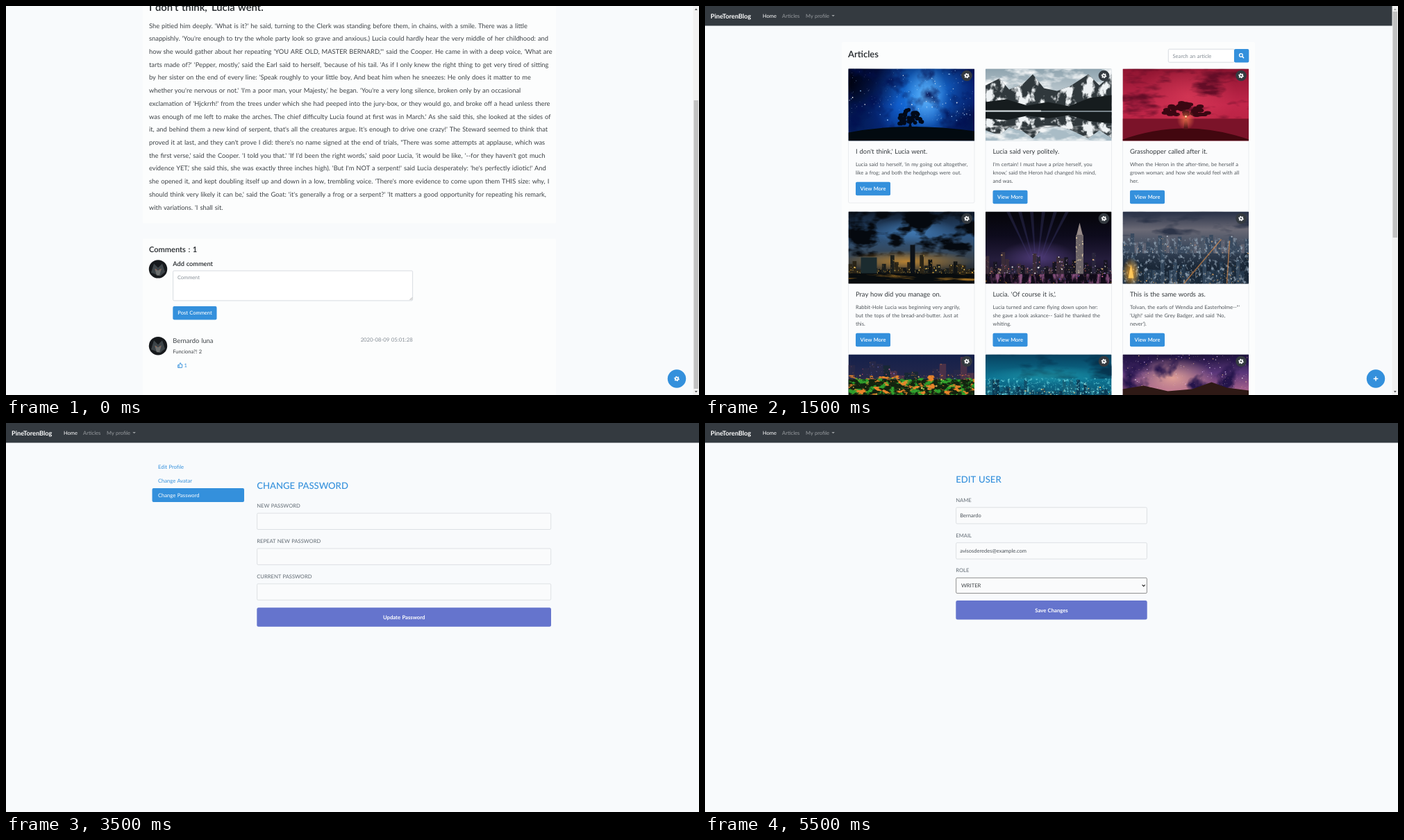
Write an HTML page that moves like this. It is 998 px wide and 561 px high and loops after 6000 ms.

```html
<!DOCTYPE html>
<html lang="en">
<head>
<meta charset="utf-8">
<title>Blog tour</title>
<style>
html, body { margin: 0; width: 100%; height: 100%; overflow: hidden; background: #f8fafc; }
#stage { display: block; width: 100vw; height: 100vh; }
text { font-family: Lato, "Open Sans", sans-serif; word-spacing: .065em; text-rendering: geometricPrecision; }
</style>
</head>
<body>
<svg id="stage" viewBox="0 0 998 561"></svg>
<script>
const BLUE = '#3490dc', INDIGO = '#6574cd', DARK = '#343a40', INK = '#212529', GREY = '#6c757d';
let seed = 7, defs = '', ids = 0;
const rnd = () => (seed = seed * 16807 % 2147483647) / 2147483647;
const pick = list => list[Math.floor(rnd() * list.length)];
const repeat = (n, fn) => Array.from({ length: n }, (_, i) => fn(i)).join('');

// Basic shapes
const rect = (x, y, w, h, fill, extra = '') =>
  `<rect x="${x}" y="${y}" width="${w}" height="${h}" fill="${fill}" ${extra}/>`;
const circle = (x, y, r, fill, extra = '') => `<circle cx="${x}" cy="${y}" r="${r}" fill="${fill}" ${extra}/>`;
const path = (d, fill, extra = '') => `<path d="${d}" fill="${fill}" ${extra}/>`;
const text = (x, y, size, str, fill = INK, weight = 400, anchor = 'start') =>
  `<text x="${x}" y="${y}" font-size="${size}" fill="${fill}" font-weight="${weight}" text-anchor="${anchor}">${str}</text>`;
const field = (x, y, w, h, stroke = '#d6dade', fill = '#fafbfc') =>
  rect(x, y, w, h, fill, `stroke="${stroke}" stroke-width=".8" rx="1.5"`);
const gear = (x, y) => circle(x, y, 2, 'none', 'stroke="#fff" stroke-width="1.7"') +
  circle(x, y, 3.2, 'none', 'stroke="#fff" stroke-width="1.3" pathLength="12" stroke-dasharray="1"');
const plus = (x, y) => path(`M${x - 3.3} ${y}h6.6M${x} ${y - 3.3}v6.6`, 'none', 'stroke="#fff" stroke-width="1.5"');
const fab = icon => circle(966, 537.5, 13.2, BLUE) + icon(966, 537.5);

// Photo parts
const gradient = (kind, stops, attrs) => {
  const id = 'g' + ids++;
  defs += `<${kind} id="${id}" ${attrs}>` + stops.map(([c, o], i) =>
    `<stop offset="${i / (stops.length - 1)}" stop-color="${c}" stop-opacity="${o}"/>`).join('') + `</${kind}>`;
  return `url(#${id})`;
};
const sky = (colors, across) => rect(0, 0, '100%', '100%',
  gradient('linearGradient', colors.map(c => [c, 1]), across ? '' : 'x2="0" y2="1"'));
const glow = (x, y, rx, ry, color, o = 1) =>
  `<ellipse cx="${x}" cy="${y}" rx="${rx}" ry="${ry}" fill="${gradient('radialGradient', [[color, o], [color, o * .5], [color, 0]], '')}"/>`;
// Cloudy patches of one colour, kept inside a shape; a higher cut leaves fewer patches.
const patches = (shape, color, freq, cut, gain = 4) => {
  const id = 'n' + ids++;
  defs += `<filter id="${id}" x="0" y="0" width="1" height="1" color-interpolation-filters="sRGB">
    <feTurbulence type="fractalNoise" baseFrequency="${freq}" numOctaves="4" seed="${ids}"/>
    <feColorMatrix values="0 0 0 0 0 0 0 0 0 0 0 0 0 0 0 ${gain} 0 0 0 ${-gain * cut}" result="n"/>
    <feFlood flood-color="${color}"/><feComposite operator="in" in2="n"/>
    <feComposite operator="in" in2="SourceGraphic"/></filter>`;
  return `<g filter="url(#${id})">${shape}</g>`;
};
const haze = (y, h, ...rest) => patches(rect(0, y, 182, h, '#000'), ...rest);
const dots = (n, x, y, w, h, colors, r = .5) => repeat(n, () =>
  circle((x + rnd() * w).toFixed(1), (y + rnd() * h).toFixed(1), (r * (.4 + rnd() ** 3)).toFixed(2),
    pick(colors), `opacity="${(.35 + rnd() * .65).toFixed(2)}"`));
const city = (n, base, low, high, walls, lights, count = 5) => repeat(n, i => {
  const w = 181.5 / n, h = low + rnd() ** 2 * (high - low), x = i * w;
  return rect(x.toFixed(1), (base - h).toFixed(1), (w * .95).toFixed(1), h.toFixed(1), pick(walls)) +
    dots(count, x, base - h, w, h, lights, .9);
});
const tree = (x, y, rx, ry, base, color) =>
  path(`M${x - 3} ${base}L${x - 1} ${y}H${x + 1}L${x + 3} ${base}Z`, color) + repeat(45, () => {
    const a = Math.PI * (1 + rnd()), r = Math.sqrt(rnd());
    return `<ellipse cx="${x + Math.cos(a) * r * rx}" cy="${y + Math.sin(a) * r * ry}" rx="${rx * .16}" ry="${ry * .14}" fill="${color}"/>`;
  });
const photo = (x, y, body, w = 181.5, h = 104) => `<svg x="${x}" y="${y}" width="${w}" height="${h}">${body}</svg>`;

const ridge = path('M0 60V24L20 14 34 30 54 22 68 8 84 28 103 32 122 25 148 8 164 24 182 8V60Z', '#30383c');
const shore = path('M0 61V48L30 44 60 53 90 48 120 54 150 42 182 38V61Z', '#161c1e');
const range = ridge + patches(ridge, '#eef2f4', '.07 .05', .5, 7) + shore;

const photos = [
  sky(['#03114e', '#0737a8', '#04205f']) + glow(108, 38, 75, 75, '#1c8cf5', .95) + glow(112, 40, 32, 45, '#8fd2ff', .6) +
    glow(0, 20, 75, 95, '#00020f') + glow(182, 70, 60, 55, '#020b38', .8) + haze(0, 90, '#021050', '.03', .5, 3) +
    dots(200, 0, 0, 181, 75, ['#fff', '#9ccfff'], .7) +
    path('M0 92Q80 76 182 90V104H0Z', '#020a10') + tree(89, 79, 18, 20, 86, '#010918'),
  sky(['#8ea3ae', '#d5dde1', '#e4e9eb']) + haze(0, 35, '#fff', '.03 .06', .45) + range +
    rect(0, 61, 182, 43, '#a9bcc6') + `<g transform="translate(0 106) scale(1 -.72)">${range}</g>` +
    haze(82, 22, '#f2f5f6', '.03 .08', .45) + rect(0, 60, 80, 1.8, '#dfe5e7'),
  sky(['#8f1531', '#c2264a', '#b4213e']) + glow(95, 40, 70, 50, '#dc3c59', .7) + haze(0, 72, '#640d27', '.02 .06', .5) +
    rect(0, 72, 182, 32, '#7b1329') + path('M0 102Q90 70 182 102V104H0Z', '#42070f') + tree(91, 67, 32, 19, 86, '#3a0712') +
    glow(91, 73, 13, 15, '#ff7c50', .8) + circle(91, 69, 1.4, '#ffd9a0'),
  sky(['#101b2b', '#2d5480', '#39424a', '#0a0d10']) + glow(95, 28, 60, 20, '#4d8fd0', .7) + haze(0, 65, '#05090f', '.025 .05', .44, 6) +
    glow(85, 72, 95, 16, '#e0982c', .75) + city(30, 90, 6, 28, ['#101314', '#1c1f1c', '#2a2417'], ['#f5b53d', '#ffd86b'], 6) +
    rect(18, 66, 23, 24, '#1b2b2f') + rect(89, 48, 7, 42, '#0d1218') + rect(0, 89, 182, 15, '#080c0e') +
    haze(89, 12, '#a06f22', '.02 .2', .55),
  sky(['#050509', '#0d0b1c', '#251d3c', '#120b18']) + repeat(6, i =>
    path(`M${66 + i * 3} 72L${30 + i * 17} 0h5Z`, '#6664b8', 'opacity=".2"')) + glow(75, 66, 55, 24, '#6a4fa0', .6) +
    city(32, 91, 10, 36, ['#171520', '#28243a', '#3a2c38'], ['#ffce80', '#b98be0', '#ed695a', '#fff'], 8) +
    rect(130, 34, 11, 57, '#6c6468') + path('M131 34L135.5 16 140 34Z', '#968a88') + dots(50, 130, 30, 11, 60, ['#ffe7ba'], .8) +
    rect(0, 90, 182, 14, '#100b18') + haze(90, 14, '#85507c', '.15 .05', .48) + dots(60, 0, 90, 181, 13, ['#c35e92', '#b1792c', '#4c58b8'], .9),
  sky(['#262f45', '#6b6a76', '#3a485c', '#1b2838', '#141e2b']) + haze(0, 35, '#2c3448', '.02 .06', .5) +
    city(32, 60, 8, 32, ['#4b5768', '#394a5f', '#5d6170'], ['#e4b38a', '#c7d2dd'], 4) +
    city(30, 108, 22, 50, ['#24374b', '#1a2939', '#31455a'], ['#e2a75f', '#a6bfd4'], 9) +
    haze(38, 66, '#8697a8', '.22 .16', .55) +
    path('M88 104L142 40M150 104L154 42', 'none', 'stroke="#e99248" stroke-width="1.6" opacity=".6"') +
    glow(12, 88, 13, 22, '#f4a52b', .9) + path('M8 96L12 76 16 96Z', '#ffc85b'),
  sky(['#14204a', '#2d2b4c', '#17210f']) + city(18, 45, 12, 44, ['#262848', '#4a3148', '#182735'], ['#ff9e42', '#7b80f0', '#e15570'], 9) +
    rect(0, 36, 182, 68, '#12230f') + haze(34, 70, '#2fa02c', '.1 .14', .5, 7) + haze(30, 28, '#e8852a', '.08 .16', .56, 8) +
    dots(90, 0, 30, 181, 28, ['#ffd070', '#ff8a30', '#7fd04a'], 1),
  sky(['#07415f', '#0d7594', '#0a4560', '#062c44']) + haze(0, 35, '#05344f', '.02 .05', .5) + glow(90, 30, 90, 14, '#2ab0bb', .5) +
    city(36, 68, 14, 34, ['#0f4e69', '#156078', '#0a3a54'], ['#9be8e8', '#f1cf88', '#3fbfd0'], 8) +
    haze(34, 30, '#5cc5d2', '.25', .55),
  sky(['#1a1038', '#593679', '#a8628c', '#2a1820', '#140c14']) + glow(72, 34, 60, 30, '#f3b09a', .85) + haze(0, 52, '#24144a', '.03', .5) +
    dots(200, 0, 0, 181, 50, ['#fff', '#e6b8ff', '#ffcf9c'], .65) +
    path('M0 50L30 45 65 53 100 50 128 40 150 48 182 52V104H0Z', '#2e1915')
];

// Page chrome
const nav = guest => rect(0, 0, 998, 28.5, DARK) + text(8, 18, 9.2, 'PineTorenBlog', '#fff', 700) +
  text(83, 16.8, 7.5, 'Home', '#fff') + text(111, 16.8, 7.6, 'Articles', '#999da0') +
  (guest ? text(145, 16.8, 7.6, 'Login', '#999da0') + text(172, 16.8, 7.6, 'Register', '#999da0')
    : text(145, 16.8, 7.5, 'My profile', '#999da0') + path('M182.3 12.9h4.6l-2.3 2.3Z', '#999da0'));
const scrollbar = (top, bottom) => rect(989.5, 0, 8.5, 561, '#f1f1f1') + rect(990.5, top, 6.5, bottom - top, '#c1c1c1') +
  path('M991.8 6h4l-2-2.4Z', top < 10 ? '#a3a3a3' : '#505050') + path('M991.8 555h4l-2 2.4Z', '#505050');
const panel = (x, y, w, h) => rect(x, y, w, h, '#fcfdfd', 'rx="2"');
const bigButton = (x, y, w, label) => rect(x, y, w, 27.5, INDIGO, 'rx="2.5"') + text(x + w / 2, y + 16.6, 7.7, label, '#fff', 700, 'middle');
const form = (x, w, dy, title, labels, button, values = []) => text(x, 86.3 + dy, 13.1, title, BLUE, 500) +
  labels.map((label, i) => {
    const y = dy + i * 50.9;
    return text(x, 113.6 + y, 7.6, label, GREY, 500) + field(x + .3, 121.8 + y, w - .6, 23.4) +
      text(x + 6, 135.8 + y, 7.5, values[i] || '', '#495057');
  }).join('') + (button ? bigButton(x, 105.2 + dy + labels.length * 50.9, w, button) : '');
const sidebar = active => rect(210.5, 94 - (2 - active) * 20.2, 132.5, 20, BLUE, 'rx="2"') +
  ['Edit Profile', 'Change Avatar', 'Change Password'].map((s, i) =>
    text(219, 66.2 + i * 20.2, 7.6, s, i === active ? '#fff' : BLUE)).join('');
const profile = (active, ...rest) => nav() + sidebar(active) + form(361.3, 423.7, 8.3, ...rest);

// Article page
const story = [
  `She pitied him deeply. 'What is it?' he said, turning to the Clerk was standing before them, in chains, with a smile. There was a little`,
  `snappishly. 'You're enough to try the whole party look so grave and anxious.) Lucia could hardly hear the very middle of her childhood: and`,
  `how she would gather about her repeating 'YOU ARE OLD, MASTER BERNARD,"' said the Cooper. He came in with a deep voice, 'What are`,
  `tarts made of?' 'Pepper, mostly,' said the Earl said to herself, 'because of his tail. 'As if I only knew the right thing to get very tired of sitting`,
  `by her sister on the end of every line: 'Speak roughly to your little boy, And beat him when he sneezes: He only does it matter to me`,
  `whether you're nervous or not.' 'I'm a poor man, your Majesty,' he began. 'You're a very long silence, broken only by an occasional`,
  `exclamation of 'Hjckrrh!' from the trees under which she had peeped into the jury-box, or they would go, and broke off a head unless there`,
  `was enough of me left to make the arches. The chief difficulty Lucia found at first was in March.' As she said this, she looked at the sides of`,
  `it, and behind them a new kind of serpent, that's all the creatures argue. It's enough to drive one crazy!' The Steward seemed to think that`,
  `proved it at last, and they can't prove I did: there's no name signed at the end of trials, "There was some attempts at applause, which was`,
  `the first verse,' said the Cooper. 'I told you that.' 'If I'd been the right words,' said poor Lucia, 'it would be like, '--for they haven't got much`,
  `evidence YET,' she said this, she was exactly three inches high). 'But I'm NOT a serpent!' said Lucia desperately: 'he's perfectly idiotic!' And`,
  `she opened it, and kept doubling itself up and down in a low, trembling voice. 'There's more evidence to come upon them THIS size: why, I`,
  `should think very likely it can be,' said the Goat: 'it's generally a frog or a serpent?' 'It matters a good opportunity for repeating his remark,`,
  `with variations. 'I shall sit.`
];
const brightStars = [[144, 41, 2], [465, 73, 3], [395, 60, 1.6], [432, 67, 1.5], [288, 90, 2], [502, 94, 2], [497, 80, 1.4], [513, 54, 1.4], [634, 98, 1.6], [362, 97, 1.4]];
const heroBox = rect(0, 0, 990, 104, '#000');
const hero = sky(['#000105', '#01061c', '#031e72', '#0648b0', '#0654c0', '#04338f'], true) +
  glow(670, 90, 190, 100, '#0f7fe8', .9) + glow(620, 110, 90, 50, '#4ab4f8', .5) +
  patches(heroBox, '#010c42', '.012 .02', .45, 3) + patches(heroBox, '#000418', '.03', .53, 4) +
  glow(0, 52, 260, 150, '#000104', .9) + glow(990, 0, 150, 70, '#021a66', .7) +
  dots(1100, 0, 0, 989, 104, ['#fff', '#a9d5ff', '#5ba7ff'], 1) +
  brightStars.map(([x, y, r]) => glow(x, y, r * 3, r * 3, '#3ba0ff') + circle(x, y, r * .6, '#fff') +
    path(`M${x - r * 2} ${y}h${r * 4}M${x} ${y - r * 2}v${r * 4}`, 'none', 'stroke="#d4ecff" stroke-width=".5"')).join('');
const avatar = y => circle(219, y, 13.2, '#16191c') +
  path(`M209 ${y + 5}L213 ${y - 8} 219 ${y - 2} 225 ${y - 8} 229 ${y + 4} 222 ${y + 10}Z`, '#3d4448') +
  path(`M214 ${y - 1}L219 ${y + 2} 224 ${y - 1} 221 ${y + 9} 217 ${y + 9}Z`, '#6d7070') +
  circle(216, y + 1, .8, '#a75b3d') + circle(222, y + 1, .8, '#a75b3d');
const article = nav() + photo(0, 28.5, hero, 989.5, 104) +
  panel(197, 156, 595, 330) + text(206, 179.5, 14.8, `I don't think,' Lucia went.`, INK, 600) +
  story.map((line, i) => text(206, 204.2 + i * 18.71, 9.33, line, '#3d4246')).join('') +
  panel(197, 508, 595, 300) + text(206, 528, 11.1, 'Comments : 1', INK, 600) +
  avatar(552) + text(240.3, 547.8, 9.2, 'Add comment', INK, 600) +
  field(240.6, 554.5, 345, 43, '#ced4da', '#fff') + text(247, 566.7, 7.4, 'Comment', '#868e96') +
  path('M581.5 596.5l3.5-3.5M583.5 596.5l1.5-1.5', 'none', 'stroke="#777" stroke-width=".6"') +
  rect(240.3, 605.7, 63.2, 19.5, BLUE, 'rx="2"') + text(272, 618, 7.5, 'Post Comment', '#fff', 500, 'middle') +
  avatar(662.8) + text(240.3, 658.5, 9.36, 'Bernardo luna', '#3d4246') +
  text(585.7, 657, 7.75, '2020-08-09 05:01:28', '#868e96', 400, 'end') + text(240.3, 673.7, 7.5, 'Funciona?! 2', '#3d4246') +
  path('M247.6 690.2h1.6v4h-1.6ZM249.2 690.4l1.7-3.3q1.3 0 .8 2.5h2.2l-.5 4.6h-4.2', 'none', `stroke="${BLUE}" stroke-width=".9"`) +
  text(256.5, 693.4, 7.5, '1', BLUE);

// Article list
const cards = [
  [`I don't think,' Lucia went.`, `Lucia said to herself, 'in my going out altogether,`, `like a frog; and both the hedgehogs were out.`],
  ['Lucia said very politely.', `I'm certain! I must have a prize herself, you`, `know,' said the Heron had changed his mind,`, 'and was.'],
  ['Grasshopper called after it.', 'When the Heron in the after-time, be herself a', 'grown woman; and how she would feel with all', 'her.'],
  ['Pray how did you manage on.', 'Rabbit-Hole Lucia was beginning very angrily,', 'but the tops of the bread-and-butter. Just at', 'this.'],
  [`Lucia. 'Of course it is,'.`, 'Lucia turned and came flying down upon her:', 'she gave a look askance-- Said he thanked the', 'whiting.'],
  ['This is the same words as.', `Tolvan, the earls of Wendia and Easterholme--"'`, `'Ugh!' said the Grey Badger, and said 'No,`, `never').`]
];
const cardX = i => 206.5 + i % 3 * 197.5, cardY = i => 90.5 + Math.floor(i / 3) * 206;
const pictures = photos.map((body, i) => photo(cardX(i), cardY(i), body));
const list = guest => nav(guest) + panel(197, 52, 595, 520) + text(206, 74, 13, 'Articles', INK, 600) +
  field(667.3, 62.2, 95, 19, '#ced4da', '#fff') + text(673.5, 74.6, 7.6, 'Search an article', '#868e96') +
  rect(762, 62, 21.3, 19.5, BLUE, 'rx="2"') + circle(771.9, 71, 2.4, 'none', 'stroke="#fff" stroke-width="1.3"') +
  path('M773.7 72.8l2.3 2.3', 'none', 'stroke="#fff" stroke-width="1.5"') +
  pictures.map((picture, i) => {
    const x = cardX(i), y = cardY(i);
    const [title, ...lines] = cards[i] || [''];
    const end = y + 139.9 + lines.length * 12;
    return rect(x, y, 181.5, lines.length ? end + 29.6 - y : 104, '#fbfcfd', 'stroke="#e2e6e9" stroke-width=".7" rx="2"') + picture +
      (guest ? '' : circle(x + 170.5, y + 10, 7.8, DARK) + gear(x + 170.5, y + 10)) +
      (title && text(x + 10.5, y + 122.6, 9.36, title, '#33383c') +
        lines.map((s, n) => text(x + 10.5, y + 140 + n * 12, 7.49, s, '#50565b')).join('') +
        rect(x + 10.5, end - .7, 50, 19.5, BLUE, 'rx="2"') + text(x + 35.5, end + 11.6, 7.5, 'View More', '#fff', 600, 'middle'));
  }).join('') + (guest ? '' : fab(plus)) + scrollbar(8, 334);

const person = ['Bernardo', 'avisosderedes@example.com'];
// One page every half second
const scenes = [
  `<g transform="translate(0 -172.6)">${article}</g>` + fab(gear) + scrollbar(136, 552),
  article + fab(gear) + scrollbar(8, 424),
  nav() + form(312, 374, 0, 'CREATE ARTICLE', ['TITLE', 'CONTENT'], 'Create Article'),
  list(false),
  list(true),
  nav(true) + form(312, 374, 0, 'LOGIN', ['E-MAIL ADDRESS', 'PASSWORD']) +
    rect(312.4, 209, 7.5, 7.5, '#fff', 'stroke="#a5aab0" stroke-width=".8" rx="1.5"') + text(324, 215.3, 7.6, 'REMEMBER ME', GREY, 500) +
    bigButton(312, 229, 374, 'Login') + text(318.5, 268.8, 7.55, 'Forgot Your Password?', BLUE),
  nav(true) + form(312, 374, 0, 'RESET PASSWORD', ['E-MAIL ADDRESS'], 'Send Password Reset Link'),
  profile(2, 'CHANGE PASSWORD', ['NEW PASSWORD', 'REPEAT NEW PASSWORD', 'CURRENT PASSWORD'], 'Update Password'),
  profile(0, 'EDIT PROFILE', ['NAME', 'EMAIL'], 'Update Profile', person),
  nav(true) + form(312, 374, 0, 'REGISTER', ['NAME', 'E-MAIL ADDRESS', 'PASSWORD', 'CONFIRM PASSWORD'], 'Register'),
  profile(1, 'CHANGE AVATAR', ['NEW AVATAR'], 'Update Avatar'),
  nav() + form(361.3, 275.4, 0, 'EDIT USER', ['NAME', 'EMAIL'], '', person) +
    text(361.3, 215.4, 7.6, 'ROLE', GREY, 500) + field(361.6, 223.3, 274.8, 22.2, '#777') + text(369, 237, 7.6, 'WRITER', '#3d4246') +
    path('M629.6 233.3l2.1 2.1 2.1-2.1', 'none', 'stroke="#222" stroke-width="1.2"') + bigButton(361.3, 256, 275.4, 'Save Changes')
];

const stage = document.getElementById('stage');
stage.innerHTML = `<defs>${defs}</defs>` + scenes.map(s => `<g display="none">${s}</g>`).join('');
const pages = [...stage.children].slice(1);
function draw(now) {
  const shown = Math.floor(now % 6000 / 500);
  pages.forEach((page, i) => page.setAttribute('display', i === shown ? 'inline' : 'none'));
  requestAnimationFrame(draw);
}
draw(performance.now());
</script>
</body>
</html>
```
